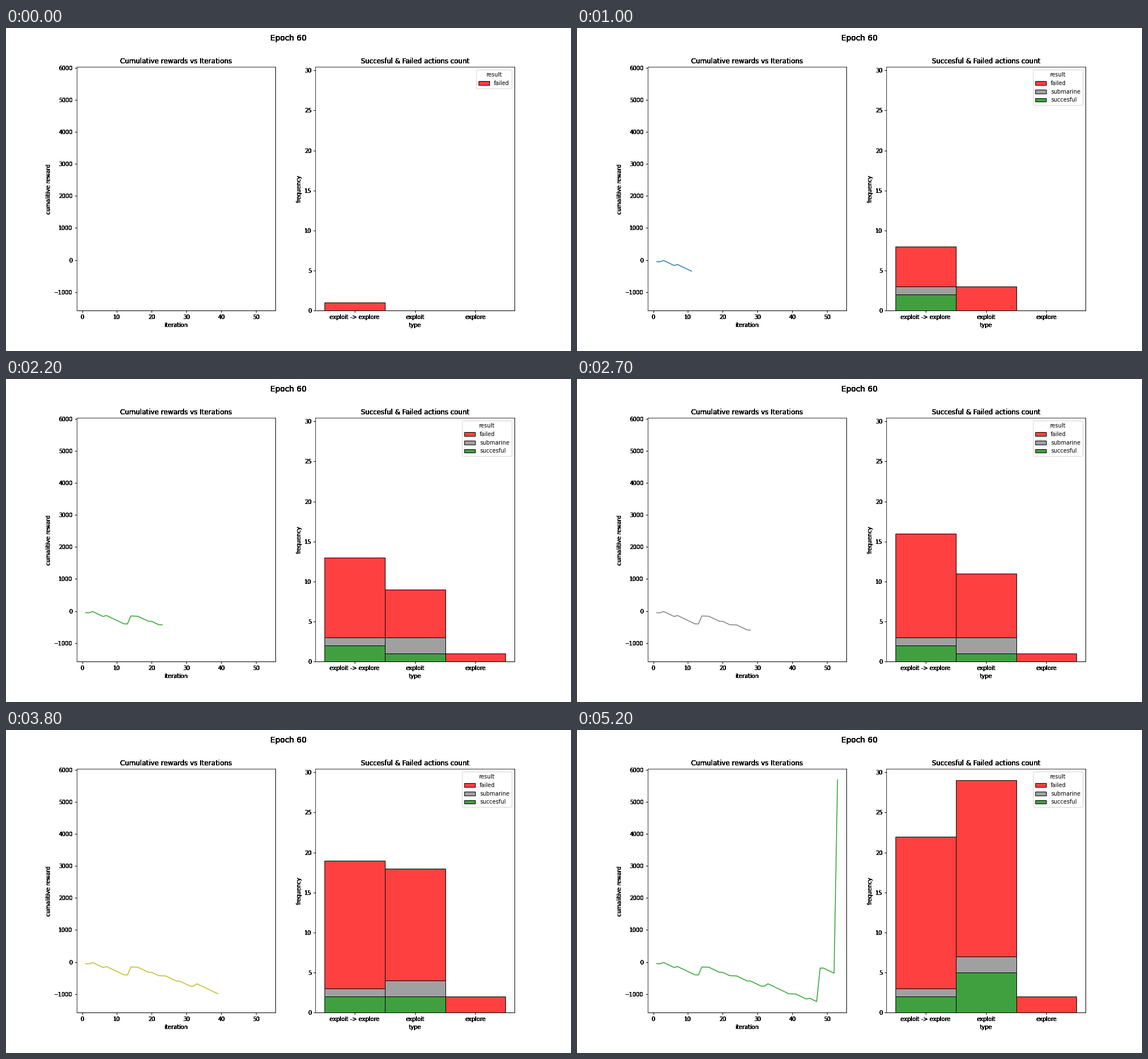
Recreate the animation shown at these times as a matplotlib script. Size 990 by 566 pixels, loop 5300 ms.

```python
import numpy as np
import matplotlib.pyplot as plt
from matplotlib.animation import FuncAnimation
from matplotlib.colors import to_rgba
from matplotlib.patches import Patch

DPI = 990 / 14
SIZE = np.array([990, 566]) + 1e-6  # guards against rounding down a pixel
STEPS = 53
plt.rcParams.update({"font.family": "DejaVu Sans", "font.size": 10})

TYPES = ["exploit -> explore", "exploit", "explore"]
RESULTS = {"failed": "red", "submarine": "grey", "succesful": "green"}
FAILED, SUBMARINE, SUCCESFUL = range(3)

# Rules of the game: a miss is dear, a repeated shot cheap, a hit pays.
MISS, REPEAT = -52, -4
REPEATS = [2, 13, 15, 16, 20, 23, 24, 28, 32, 40, 41, 49]
SUBMARINES = [2, 15, 16]
HITS = {3: 40, 7: 30, 14: 250, 33: 75, 45: 25, 48: 1047, 53: 6040}
EXPLOITS = [(4, 6), (14, 19), (25, 26), (32, 33), (35, 43), (45, 45), (48, 53)]
EXPLORES = [13, 31]


def play():
    """Return type, result and cumulative reward of every step."""
    kinds, results, rewards = [], [], []
    total = 0
    for step in range(1, STEPS + 1):
        exploit = any(first <= step <= last for first, last in EXPLOITS)
        kinds.append(2 if step in EXPLORES else int(exploit))
        results.append(SUCCESFUL if step in HITS else
                       SUBMARINE if step in SUBMARINES else FAILED)
        total += HITS.get(step, REPEAT if step in REPEATS else MISS)
        rewards.append(total)
    return np.array(kinds), np.array(results), np.array(rewards)


def harden(image, dpi):
    """Thicken soft edges, for heavy lettering."""
    image[..., :3] = 0
    image[..., 3] = np.minimum(1, 4 * image[..., 3])
    return image, 0, 0


def style(ax, title, xlabel, ylabel):
    ax.set_title(title, fontsize=12)
    ax.set_xlabel(xlabel)
    ax.set_ylabel(ylabel)
    for part in (ax.title, ax.xaxis, ax.yaxis,
                 ax.spines["right"], ax.spines["bottom"]):
        part.set_agg_filter(harden)


def padded(low, high, margin=0.05):
    pad = margin * (high - low)
    return low - pad, high + pad


kinds, results, rewards = play()
iterations = np.arange(1, STEPS + 1)

fig, (ax_line, ax_bar) = plt.subplots(
    1, 2, figsize=SIZE / DPI, dpi=DPI, facecolor="white",
    gridspec_kw=dict(left=0.125, right=0.9, bottom=0.125, top=0.88,
                     wspace=0.201))
fig.suptitle("Epoch 60", fontsize=14, fontweight="normal").set_agg_filter(harden)

style(ax_line, "Cumulative rewards vs Iterations", "iteration",
      "cumalitive reward")
ax_line.set_xlim(*padded(1, STEPS))
ax_line.set_ylim(*padded(rewards.min(), rewards.max()))
curve, = ax_line.plot([], [], lw=1.5)

style(ax_bar, "Succesful & Failed actions count", "type", "frequency")
ax_bar.set_xlim(*padded(-0.5, 2.5))
ax_bar.set_ylim(0, np.bincount(kinds).max() * 1.05)
ax_bar.set_xticks(range(3), TYPES)

looks = [dict(facecolor=to_rgba(color, 0.75), edgecolor="black", linewidth=1)
         for color in RESULTS.values()]
bars = [ax_bar.bar(range(3), [0] * 3, width=1, **look) for look in looks]
keys = [Patch(label=name, **look) for name, look in zip(RESULTS, looks)]


def update(frame):
    count = frame + 1
    curve.set_data(iterations[:count], rewards[:count])
    curve.set_color(f"C{frame % 10}")

    base = np.zeros(3)
    for result in (SUCCESFUL, SUBMARINE, FAILED):
        heights = np.bincount(kinds[:count][results[:count] == result],
                              minlength=3)
        for bar, bottom, height in zip(bars[result], base, heights):
            bar.set_y(bottom)
            bar.set_height(height)
            bar.set_visible(height > 0)
        base += heights

    seen = results[:count].max() + 1
    ax_bar.legend(handles=keys[:seen], title="result", loc="upper right")


anim = FuncAnimation(fig, update, frames=STEPS, interval=100,
                     init_func=lambda: update(0), repeat=True,
                     repeat_delay=0, blit=False)
plt.show()
```
